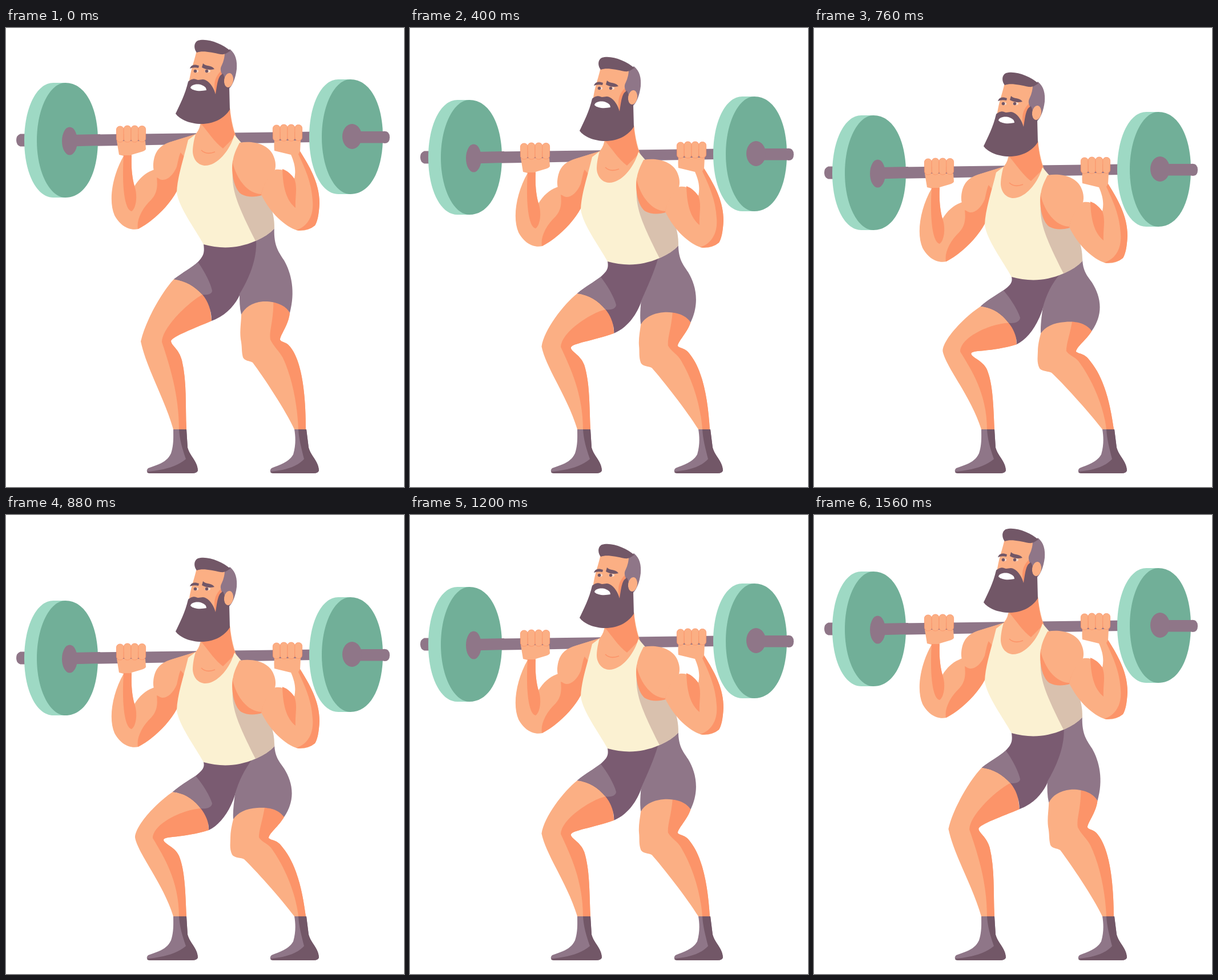
An HTML page for the animation above (1.6 s loop, 697 by 804 pixels).

```html
<!DOCTYPE html>
<html lang="en">
<head>
<meta charset="utf-8">
<title>Barbell squat</title>
<style>
  html, body { margin: 0; width: 100%; height: 100%; overflow: hidden; background: #fff; }
  svg { display: block; width: 100vw; height: 100vh; }
  .skin { fill: #fbaf84; }
  .shade { fill: #fc9469; }
  .metal { fill: #8f7688; }
  .hair { fill: #725767; }
  .shorts { fill: #7a5b71; }
  .rim { fill: #9ed9c4; }
  .plate { fill: #71af98; }
  .shirt { fill: #fbf1d2; }
  .fold { fill: #d9c1ae; }
  .white { fill: #fff; }
  .finger { fill: #fbaf84; stroke: #fc9469; stroke-width: .8; }
  .crease { fill: none; stroke: #fc9469; stroke-width: 1.6; }
</style>
</head>
<body>
<svg viewBox="0 0 697 804">
  <defs>
    <g id="disc">
      <path class="rim" d="M105 96H83C53 96 32 141 32 197S53 297 83 297H105Z"/>
      <path class="plate" d="M104 96C77 96 54 141 54 197S77 297 104 297C140 297 161 253 161 197S140 96 104 96Z"/>
    </g>
    <g id="fingers" class="finger">
      <rect x="193.4" y="172" width="12.8" height="28" rx="6"/>
      <rect x="206.2" y="171" width="12.8" height="29" rx="6"/>
      <rect x="219" y="171" width="12.8" height="29" rx="6"/>
      <rect x="231.8" y="171.500" width="12.8" height="28" rx="6"/>
    </g>
  </defs>

  <!-- Feet -->
  <path class="metal" d="M293 703H316L318 735C322 750 335 758 336 775Q335 780 325 780H252Q243 777 249 771C265 765 281 762 289 745C294 730 293 715 293 703Z"/>
  <path class="hair" d="M303 703H316L318 735C322 750 335 758 336 775Q335 780 325 780H252Q247 780 247 777C275 775 300 768 315 755C308 735 304 720 303 703Z"/>
  <path class="metal" d="M505 703H526L530 735C534 750 547 758 548 775Q547 780 538 780H468Q459 777 465 771C480 765 496 760 503 747C508 730 507 715 505 703Z"/>
  <path class="hair" d="M512 703H526L530 735C534 750 547 758 548 775Q547 780 538 780H468Q463 780 463 777C490 775 510 768 522 755C517 735 513 720 512 703Z"/>

  <!-- Legs and shorts bend from d to data-low -->
  <path class="skin" d="M294 440C275 460 245 510 236 549C246 596 278 650 293 703L316 703C314 660 317 620 308 582C303 562 289 556 289 548C292 540 330 526 360 513L352 450Z"
    data-low="M292 485C262 505 226 545 226 565C231 593 275 645 293 703L316 703C314 655 313 622 303 597C296 581 276 576 276 569C277 562 310 566 355 552L350 495Z"/>
  <path class="shade" d="M344 467C320 480 273 525 273 550C286 590 303 640 303 703L316 703C314 660 317 620 308 582C303 562 289 556 289 548C292 540 330 526 360 513L352 450Z"
    data-low="M341 514C310 516 258 540 257 566C276 598 303 640 303 703L316 703C314 655 313 622 303 597C296 581 276 576 276 569C277 562 310 566 355 552L350 495Z"/>
  <path class="skin" d="M412 502L425 470L480 470L497 499C495 520 480 538 480 546C483 552 492 548 501 563C520 592 525 650 525 703L505 703C490 670 450 610 432 586C425 582 419 584 415 577C412 565 414 560 411 545C409 530 412 515 412 502Z"
    data-low="M398 533L412 500L475 500L487 529C478 545 460 558 460 566C466 571 475 568 485 583C511 615 520 665 525 703L505 703C480 670 435 620 417 603C412 600 400 601 396 595C391 585 393 575 393 565C393 555 395 545 398 533Z"/>
  <path class="shade" d="M468 472C470 510 460 530 463 546C470 560 478 565 485 578C500 610 510 655 512 703L525 703C525 650 520 592 501 563C492 548 483 552 480 546C480 538 495 520 497 499L480 470Z"
    data-low="M454 505C450 535 443 550 443 565C450 575 460 575 467 587C490 620 508 665 512 703L525 703C520 665 511 615 485 583C475 568 466 571 460 566C460 558 478 545 487 529L475 500Z"/>
  <path class="shorts" d="M344 370L346 379C348 394 346 399 336 410C325 420 310 428 294 440C315 443 330 452 344 467C355 480 360 497 360 513C385 504 402 485 410 466L450 420L445 360Z"
    data-low="M344 424L346 433C348 442 345 447 332 457C320 465 306 473 292 485C312 487 328 497 341 514C350 525 356 540 355 552C375 543 393 518 402 487L440 460L445 414Z"/>
  <path class="metal" d="M336 410C345 422 358 445 361 460C361 467 350 468 344 467C330 452 315 443 294 440C310 428 325 420 336 410Z"
    data-low="M332 457C345 472 357 492 361 505C360 514 348 515 341 514C328 497 312 487 292 485C306 473 320 465 332 457Z"/>
  <path class="metal" d="M438 362L470 345C468 380 476 390 487 407C500 430 507 462 497 499C490 485 470 478 450 479C430 481 418 490 412 502C409 490 409 478 409 466C425 440 440 405 438 372Z"
    data-low="M438 416L470 399C470 425 480 433 487 444C502 468 508 498 487 529C475 513 455 512 440 513C420 514 405 522 398 533C397 520 399 505 401 489C408 465 418 445 432 427Z"/>

  <g id="upper">
    <!-- Barbell -->
    <path class="metal" d="M34 185.500H25Q18 188 18 196.500T25 207.500H34ZM111 187V207.500L540 200V181.500Z"/>
    <use href="#disc"/>
    <use href="#disc" x="499" y="-6"/>
    <path class="metal" d="M111 187V207.500L165 206V186ZM606 181H660Q672 179 672 191.500T660 201.500H606Z"/>
    <ellipse class="metal" cx="111.500" cy="198" rx="13.500" ry="24.500"/>
    <ellipse class="metal" cx="606" cy="190" rx="17" ry="22"/>

    <!-- Left arm -->
    <path class="skin" d="M194 198H244L245 212Q244 215 237 217L220 222C219 245 221 263 225 277C236 259 250 250 264 247C255 225 266 206 290 199L332 186L325 250L299 286C285 312 258 338 232 352C215 356 199 345 190 328C179 303 186 259 206 224L198 222Z"/>
    <path class="shade" d="M206 223H220C219 245 221 263 225 277C231 293 228 316 220 321C206 318 203 268 206 223Z"/>
    <path class="shade" d="M231 352C228 336 239 315 255 300C264 290 266 278 264 262C283 270 300 247 303 215L325 240L299 286C285 312 258 338 231 352Z"/>
    <path class="skin" d="M258 238C260 215 270 205 290 199L332 186L316 206C303 215 303 228 299 243C293 258 282 267 273 266C262 264 257 250 258 238Z"/>
    <use href="#fingers"/>

    <!-- Neck and chest -->
    <path class="skin" d="M342 160L340 170Q338 180 330 188L322 245H375L405 195Q396 175 392 140Z"/>
    <path class="shade" d="M341 167C354 182 365 200 380 211L402 189Q394 172 392 140Z"/>
    <path class="crease" d="M342 214Q351 223 366 217"/>

    <!-- Shirt -->
    <path class="shirt" d="M319 196L332 186C328 200 327 210 327 217C328 232 338 241 349 241C370 241 392 215 400 187L412 201L450 290C458 310 471 322 470 351C462 360 450 367 437 373C405 387 375 387 346 379C330 350 303 315 299 288C300 260 311 230 319 196Z"/>
    <path class="fold" d="M398 240C393 280 402 303 437 373Q459 364 470 351C470 322 463 310 450 285Z"/>

    <!-- Right arm -->
    <path class="shade" d="M397 233C394 250 398 281 412 291C423 297 437 296 448 293L460 260L410 215Z"/>
    <path class="skin" d="M470 197H516L515 216C532 243 549 272 549 307C548 328 545 340 541 346Q529 356 512 355C490 349 464 326 447 292C450 275 460 256 472 248C485 246 496 253 505 264C508 250 506 238 499 222L470 215Q469 207 470 197Z"/>
    <path class="shade" d="M515 216C532 243 549 272 549 307C548 328 545 340 541 346Q529 356 508 354C530 347 539 327 537 303C535 270 524 247 512 221Z"/>
    <path class="shade" d="M484 247C485 280 491 302 507 315C506 295 511 280 505 264Q496 251 484 247Z"/>
    <path class="skin" d="M409 201C430 197 457 202 467 221C474 235 472 244 471 249C457 262 450 278 447 291C423 290 404 265 397 236C398 222 404 211 409 201Z"/>
    <use href="#fingers" x="274" y="-2"/>

    <!-- Head -->
    <path class="skin" d="M334 38C331 56 323 72 320 100L345 125L385 110L394 100L392 40Z"/>
    <path class="shade" d="M378 74C367 84 362 95 367 116L385 100Z"/>
    <path class="metal" d="M383 44L392 37C403 46 405 58 404 72C402 88 397 100 391 106L379 90C381 80 372 76 378 65Q383 54 383 44Z"/>
    <path class="hair" d="M334 43C329 37 328 26 336 22C352 17 378 27 393 40C388 43 384 47 376 46C360 43 345 39 334 43Z"/>
    <path class="hair" d="M319 94C322 91 328 88 333 90C338 93 343 88 349 91C359 96 364 106 367 116C370 98 371 83 380 80L385 92C381 99 386 104 391 104L392 143C382 158 365 168 342 168C322 168 304 160 297 150C304 135 314 116 319 94Z"/>
    <ellipse class="skin" cx="390" cy="91.500" rx="8" ry="12.500" transform="rotate(8 390 91.500)"/>
    <path class="white" d="M323 105C324 99 335 97 343 100Q351 103 351 109C341 111 329 111 323 105Z"/>
    <path class="hair" d="M322 71C324 64 331 63 338 66L337 70Q329 68 322 71ZM343 69L345 62C350 68 360 64 365 72C357 74 350 73 343 69Z"/>
    <ellipse class="white" cx="333" cy="75.500" rx="4" ry="2.500" opacity=".6"/>
    <ellipse class="white" cx="353" cy="75.500" rx="5" ry="2.500" opacity=".6"/>
    <circle class="hair" cx="331.500" cy="75.500" r="2.800"/>
    <circle class="hair" cx="351.500" cy="75.500" r="2.800"/>
  </g>
</svg>
<script>
  const LOOP = 1600, STEP = 40, SPEED = 0.075, LOW_DROP = 54;
  const upper = document.getElementById('upper');
  const numbers = /-?\d+(\.\d+)?/g;
  const limbs = [...document.querySelectorAll('[data-low]')].map(el => ({
    el, high: el.getAttribute('d'), low: el.dataset.low.match(numbers)
  }));

  function pose(drop) {
    const bend = drop / LOW_DROP;
    upper.setAttribute('transform', `translate(0 ${drop})`);
    for (const { el, high, low } of limbs) {
      let i = 0;
      el.setAttribute('d', high.replace(numbers, n => (+n + (low[i++] - n) * bend).toFixed(2)));
    }
  }

  function draw() {
    const t = Math.floor(performance.now() % LOOP / STEP) * STEP;
    pose(Math.min(t, LOOP - t) * SPEED);
    requestAnimationFrame(draw);
  }
  draw();
</script>
</body>
</html>
```
